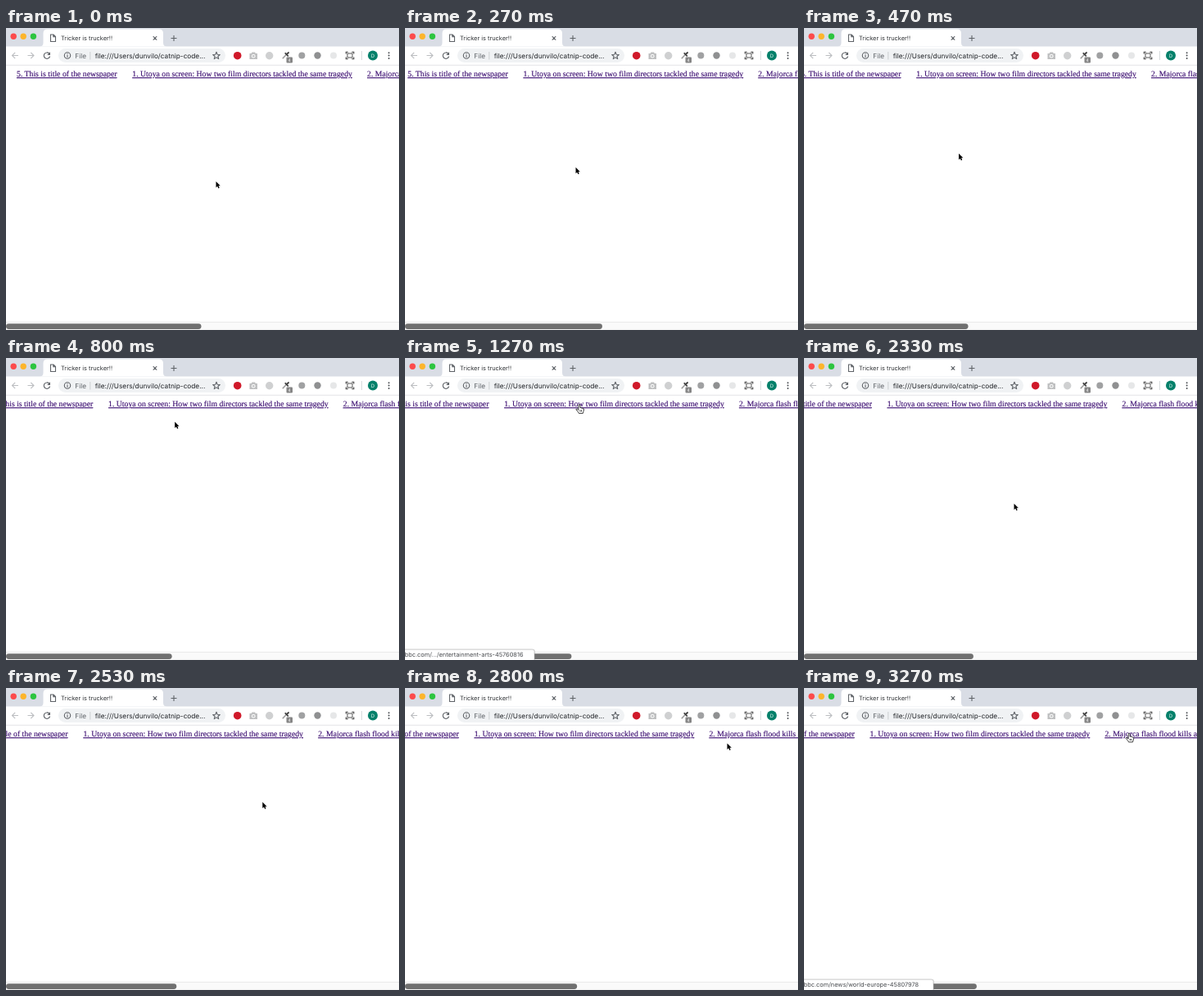
An HTML page that plays this animation: 480 by 368 pixels, repeating every 3.99 s.

```html
<!DOCTYPE html>
<html lang="en">
<head>
<meta charset="utf-8">
<title>News ticker</title>
<style>
  html, body { margin: 0; width: 100%; height: 100%; overflow: hidden; background: #fff; }
  svg { display: block; width: 100vw; height: 100vh; }
  text { text-rendering: geometricPrecision; white-space: pre; }
  .ui { font-family: Inter, Roboto, sans-serif; }
  .link {
    font: 9.75px "Liberation Serif", Times, serif; fill: #3d0f72; stroke: #3d0f72; stroke-width: .15;
    text-decoration: underline 0.8px #4a1a80;
  }
  .line { fill: none; stroke: #5f6368; stroke-width: 1.1; }
</style>
</head>
<body>
<svg viewBox="0 0 480 368">
  <rect width="480" height="368" fill="#fff"/>

  <!-- tab strip -->
  <rect width="480" height="22.5" fill="#d9dde5"/>
  <circle cx="9.2" cy="10.2" r="3.7" fill="#fc4b4b"/>
  <circle cx="21.2" cy="10.2" r="3.7" fill="#fdb52b"/>
  <circle cx="33.4" cy="10.2" r="3.7" fill="#2cc53f"/>
  <path d="M41 22.5q4.500 0 4.500-4.500V6.500q0-5 5-5H187q5 0 5 5V18q0 4.500 4.500 4.500z" fill="#fff"/>
  <path class="line" d="M54.500 8h3.500l2.500 2.500v6h-6zM57.800 8v2.700h2.700"/>
  <text class="ui" x="67" y="15" font-size="7.4" fill="#303336">Tricker is trucker!!</text>
  <path class="line" d="M179.700 10.200l4.500 4.500m0-4.500l-4.500 4.500M201.500 12.500h7m-3.500-3.500v7"/>

  <!-- toolbar -->
  <path d="M0 45.300H480" stroke="#dcdee1" stroke-width=".8"/>
  <g fill="none" stroke="#bcbec1" stroke-width="1.1">
    <path d="M15 33.500H7.500m3.700-3.700l-3.700 3.700l3.700 3.700M26.500 33.500H34m-3.700-3.700l3.700 3.700l-3.700 3.700"/>
  </g>
  <path class="line" d="M52.800 31.200A3.700 3.700 0 1 0 53.600 34.500"/>
  <path d="M54 29.200v3.800h-3.800z" fill="#5f6368"/>
  <rect x="64" y="25" width="204" height="17" rx="8.500" fill="#f0f2f4"/>
  <circle class="line" cx="75" cy="33.500" r="3.700"/>
  <path class="line" d="M75 33v2.700M75 31.200v1"/>
  <g class="ui" font-size="8.25">
    <text x="84.300" y="36.500" fill="#5f6368">File</text>
    <text x="108.700" y="36.500" fill="#202327">file:///Users/dunvilo/catnip-code...</text>
  </g>
  <path d="M102.800 29v9.500" stroke="#c4c7ca" stroke-width=".8"/>
  <path class="line" stroke-linejoin="round"
    d="M257 29.300l1.200 2.900l3.100.3l-2.400 2l.8 3.100l-2.700-1.700l-2.700 1.700l.8-3.100l-2.400-2l3.100-.3z"/>

  <!-- toolbar buttons -->
  <circle cx="282.700" cy="33.700" r="4.800" fill="#d0192a"/>
  <g fill="#bfc0c1">
    <path d="M297.500 31h2l1-1.500h3.500l1 1.500h2v7h-9.500z"/>
    <circle cx="302.200" cy="34.300" r="2.300" fill="#fff"/>
    <circle cx="302.200" cy="34.300" r="1.300"/>
    <circle cx="321.700" cy="33.700" r="4.700" fill="#cfd0d1"/>
    <circle cx="400" cy="33.500" r="4" fill="#e6e7e8"/>
  </g>
  <path d="M337.800 37.300l4.700-5" stroke="#999" stroke-width="1.500"/>
  <path d="M341.300 30.800l3 3M343 32l2-2" stroke="#444" stroke-width="1.900" stroke-linecap="round"/>
  <rect x="342.500" y="35.500" width="7.500" height="7" rx="1" fill="#858585"/>
  <text class="ui" x="346.200" y="41" font-size="5" text-anchor="middle" fill="#fff">4</text>
  <circle cx="361.300" cy="33.500" r="4" fill="#a0a1a2"/>
  <circle cx="380.500" cy="33.500" r="4.200" fill="#8f9091"/>
  <rect x="417" y="31" width="6" height="5" fill="none" stroke="#555"/>
  <path d="M415.300 31.500v-2.200h2.500m4.500 0h2.500v2.200m0 4v2.200h-2.500m-4.500 0h-2.500v-2.200" fill="none" stroke="#444" stroke-width="1.100"/>
  <path d="M434.500 28v11" stroke="#cfd2d5" stroke-width=".8"/>
  <circle cx="448" cy="33.600" r="6" fill="#04806a"/>
  <text class="ui" x="448" y="35.800" font-size="6" text-anchor="middle" fill="#e4f2ef">D</text>
  <g fill="#505458">
    <circle cx="467.600" cy="30.200" r="1"/><circle cx="467.600" cy="33.600" r="1"/><circle cx="467.600" cy="37" r="1"/>
  </g>

  <!-- page -->
  <g id="ticker">
    <text class="link" x="13" y="59.200">5. This is title of the newspaper</text>
    <text class="link" x="154.300" y="59.200">1. Utoya on screen: How two film directors tackled the same tragedy</text>
    <text class="link" x="441.100" y="59.200">2. Majorca flash flood kills at least ten</text>
  </g>
  <rect y="358" width="480" height="10" fill="#fafafa"/>
  <path d="M0 358.400H480" stroke="#e6e6e6" stroke-width=".8"/>
  <path d="M0 367.600H480" stroke="#efefef" stroke-width=".8"/>
  <rect id="thumb" y="360.200" height="6.700" rx="3.350" fill="#707070"/>

  <g id="status">
    <path d="M-2 369V354.500H156q3 0 3 3V369z" opacity=".1"/>
    <path d="M-2 369V355.200H155.500q2.500 0 2.500 2.500V369z" fill="#fff" stroke="#c2c2c2" stroke-width=".7"/>
    <text id="address" class="ui" x="-.3" y="364.300" font-size="7.38" fill="#484b4f"></text>
  </g>

  <g id="arrow">
    <path transform="scale(.86)" d="M0 0V8.600L2 6.800L3.400 9.800L4.900 9.100L3.600 6.200H6.200Z" stroke="#fff" stroke-width=".8" paint-order="stroke"/>
  </g>
  <g id="hand">
    <path transform="translate(.4 -.6)" fill="#fff" stroke="#111" stroke-width=".8" stroke-linejoin="round"
      d="M-1 1Q-1-.2 0-.2T1 1V3.800Q2.300 3.200 2.700 4.200Q4 3.700 4.300 4.800Q5.700 4.500 5.600 6L4.900 8.600L4.400 10.500H-.6L-1.500 8.800L-4 5.900Q-3.800 4.600-2.500 5.300L-1 6.500ZM1 6.500v2M2.600 6.500v2"/>
  </g>
</svg>
<script>
const LOOP = 3990, FRAME = 1000 / 15, STEP = 2.435;
const [ticker, thumb, statusBox, address, arrow, hand] =
  ['ticker', 'thumb', 'status', 'address', 'arrow', 'hand'].map(id => document.getElementById(id));

// pointer hot spot: [ms, x, y]
const path = [
  [0, 256.5, 187], [467, 189, 153], [933, 211.5, 60], [1067, 212.5, 57.5], [1733, 212.5, 57.5],
  [2000, 244.5, 145], [2333, 256.5, 177.500], [2800, 393.5, 67.5], [2933, 395.5, 59], [3067, 396.7, 56],
  [LOOP, 396.7, 56]
];

const slope = (i, axis) =>
  path[i + 1] && path[i] ? (path[i + 1][axis] - path[i][axis]) / (path[i + 1][0] - path[i][0]) : 0;

// monotone tangent: flat at turning points and rests
function tangent(i, axis) {
  const a = slope(i - 1, axis), b = slope(i, axis);
  return a * b > 0 ? 2 * a * b / (a + b) : i === 0 ? b : 0;
}

function pointer(t, axis) {
  let i = 0;
  while (i < path.length - 2 && t >= path[i + 1][0]) i++;
  const span = path[i + 1][0] - path[i][0], u = (t - path[i][0]) / span, v = 1 - u;
  return v * v * (1 + 2 * u) * path[i][axis] + u * u * (3 - 2 * u) * path[i + 1][axis]
    + span * u * v * (v * tangent(i, axis) - u * tangent(i + 1, axis));
}

function statusOpacity(n) {
  if (n < 18) return 0;
  if (n === 18 || n === 48) return 0.6;
  if (n < 31 || n > 48) return 1;
  return Math.max(0, (34 - n) / 4);
}

function draw(time) {
  const n = Math.floor((time % LOOP + 3.4) / FRAME);
  // the ticker rests while a link is hovered
  const moved = n < 27 ? Math.min(STEP * n, 33.1) : Math.min(33.1 + STEP * (n - 27), 73.7);
  ticker.setAttribute('transform', `translate(${-moved})`);

  // a copy joins the end once the first item touches the left edge
  const pageWidth = 966 - moved + (moved > 13 ? 200 : 0);
  thumb.setAttribute('width', 480 * 480 / pageWidth);

  statusBox.setAttribute('opacity', statusOpacity(n));
  address.textContent = n < 40 ? 'bbc.com/.../entertainment-arts-45760816' : 'bbc.com/news/world-europe-45807978';

  const t = Math.min(n * FRAME, LOOP), x = pointer(t, 1), y = pointer(t, 2), hovering = y < 62;
  for (const shape of [arrow, hand]) {
    shape.setAttribute('transform', `translate(${x} ${y})`);
    shape.setAttribute('visibility', (shape === hand) === hovering ? 'visible' : 'hidden');
  }
}

const start = performance.now();
function tick() {
  draw(performance.now() - start);
  requestAnimationFrame(tick);
}
tick();
</script>
</body>
</html>
```
